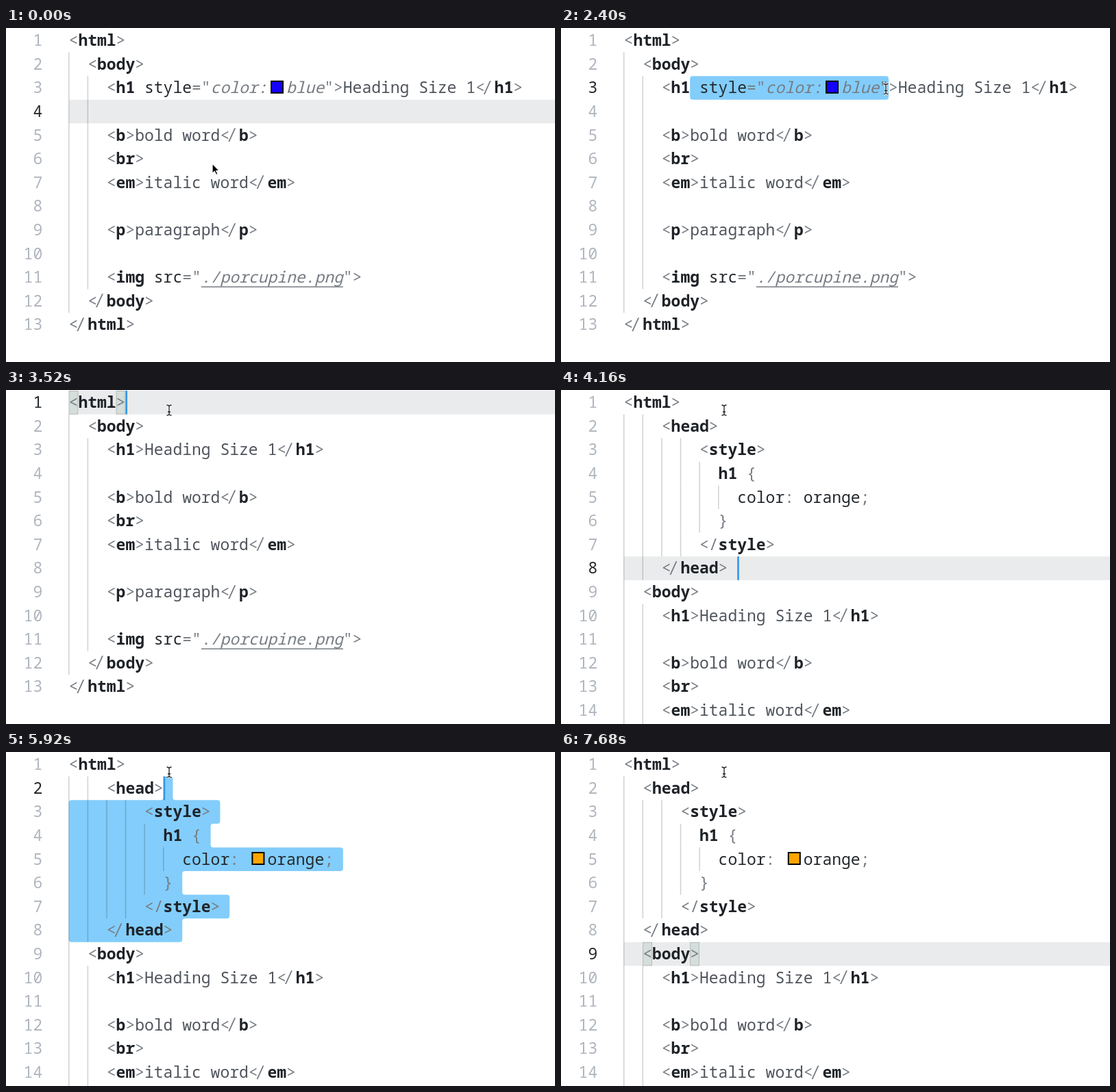
An HTML page for the animation above (8 s loop, 801 px wide and 488 px high).

```html
<!DOCTYPE html>
<html lang="en">
<head>
<meta charset="utf-8">
<title>Editing HTML</title>
<style>
  html, body { margin: 0; width: 100%; height: 100%; overflow: hidden; background: #fff; }
  svg { display: block; width: 801px; height: 488px; }
  text { font: 23px "Noto Sans Mono", "DejaVu Sans Mono", monospace; fill: #4f545c; }
  .p { fill: #777c83; }
  .t { fill: #1f2328; font-weight: 700; }
  .a { fill: #24292e; }
  .s, .u { fill: #777c83; font-style: italic; }
  .n { fill: #b0b6be; text-anchor: end; }
  .n.on { fill: #24292e; }
</style>
</head>
<body>
<svg id="stage" viewBox="0 0 801 488"></svg>
<script>
const LOOP = 8000, STEP = 160;
const X0 = 91.6, CELL = 13.8, TOP = 1, ROW = 34.6, BASE = 25.2;
const stage = document.getElementById('stage');
const rowY = line => TOP + (line - 1) * ROW;

// A line is { indent, parts }, a part is [class, text]; "sw" parts are colour swatches.
const line = (indent, ...parts) => ({ indent, parts });
const open = name => [['p', '<'], ['t', name], ['p', '>']];
const close = name => [['lig', '</'], ['t', name], ['p', '>']];
const blank = () => line(4);

function heading(styled) {
  const attr = [['a', ' style'], ['p', '="'], ['s', 'color:'], ['sw', '#1400ff'], ['s', 'blue'], ['p', '"']];
  return line(4, ['p', '<'], ['t', 'h1'], ...(styled ? attr : []), ['p', '>'],
    ['x', 'Heading Size 1'], ...close('h1'));
}

function head(indent, swatch) {
  return [
    line(indent, ...open('head')),
    line(indent + 4, ...open('style')),
    line(indent + 6, ['t', 'h1'], ['p', ' {']),
    line(indent + 8, ['a', 'color'], ['p', ': '], ...(swatch ? [['sw', '#ffa500']] : []),
      ['a', 'orange'], ['p', ';']),
    line(indent + 6, ['p', '}']),
    line(indent + 4, ['p', '</'], ['t', 'style'], ['p', '>']),
    line(indent, ...close('head'), ['x', ' '])
  ];
}

const page = (inserted, styled) => [
  line(0, ...open('html')),
  ...inserted,
  line(2, ...open('body')),
  heading(styled),
  blank(),
  line(4, ...open('b'), ['x', 'bold word'], ...close('b')),
  line(4, ...open('br')),
  line(4, ...open('em'), ['x', 'italic word'], ...close('em')),
  blank(),
  line(4, ...open('p'), ['x', 'paragraph'], ...close('p')),
  blank(),
  line(4, ['p', '<'], ['t', 'img'], ['a', ' src'], ['p', '="'], ['u', './porcupine.png'], ['p', '">']),
  line(2, ...close('body')),
  line(0, ...close('html'))
];

// Each entry changes some of the state: at = [line, column], from = selection anchor.
const script = [
  [0, { doc: page([], true), at: [4, 4], from: null, caret: false, match: null, arrow: true, ring: false }],
  [320, { arrow: false }],
  [960, { at: [3, 7], caret: true, ring: true }],
  [1120, { from: [3, 7], at: [3, 8] }],
  [1280, { at: [3, 11] }],
  [1440, { at: [3, 17] }],
  [1600, { at: [3, 24] }],
  [1760, { at: [3, 26] }],
  [2080, { ring: false }],
  [2240, { caret: false }],
  [2560, { doc: page([], false), from: null, at: [3, 7], caret: true, match: [4, 7] }],
  [3200, { at: [1, 6], match: [0, 5], ring: true }],
  [3520, { ring: false }],
  [3680, { caret: false }],
  [3840, { doc: page([line(2)], false), at: [2, 2], caret: true, match: null }],
  [4160, { doc: page(head(4, false), false), at: [8, 12] }],
  [4640, { doc: page(head(4, true), false), caret: false }],
  [5120, { from: [8, 12], at: [7, 12], caret: true }],
  [5280, { at: [6, 11] }],
  [5440, { at: [5, 12] }],
  [5600, { at: [4, 12] }],
  [5760, { at: [3, 12] }],
  [5920, { at: [2, 10] }],
  [6400, { caret: false }],
  [6560, { doc: page(head(2, true), false), from: [8, 10], at: [2, 8], caret: true }],
  [7040, { from: null, at: [8, 10] }],
  [7200, { at: [9, 8], match: [2, 7] }],
  [7680, { caret: false }]
];

const mouse = [
  [0, 301, 198], [320, 256, 148], [640, 196, 92], [960, 190, 86], [1120, 243, 90],
  [1440, 385, 94], [1760, 484, 94], [2080, 482, 92], [2400, 474, 89], [2560, 472, 89],
  [2720, 410, 72], [2880, 290, 42], [3040, 238, 29.5], [LOOP, 238, 29.5]
];

function mouseAt(t) {
  const i = mouse.findIndex(k => k[0] > t);
  const [a, b] = [mouse[i - 1], mouse[i]];
  const k = (t - a[0]) / (b[0] - a[0]);
  return [1, 2].map(j => a[j] + (b[j] - a[j]) * k);
}

const rect = (x, y, w, h, fill, more = '') =>
  `<rect x="${x}" y="${y}" width="${w}" height="${h}" fill="${fill}" ${more}/>`;
const glyphs = (x, y, cls, str) =>
  `<text x="${x}" y="${y}" class="${cls}" xml:space="preserve">${str.replace(/</g, '&lt;')}</text>`;

// Joined "</": the slash is taller, leans more and touches the bracket.
const ligature = (x, y) => glyphs(x, y, 'p', '<') +
  `<g transform="matrix(1 0 -.16 1.2 ${x + 9} ${y + 1.6})">${glyphs(0, 0, 'p', '/')}</g>`;

// Pixel x of a column; a swatch takes two cells but no column.
function colX(row, col) {
  let c = row.indent, extra = 0;
  for (const [cls, str] of row.parts) {
    if (cls !== 'sw') c += str.length;
    else if (c < col) extra += 2;
  }
  return X0 + (col + extra) * CELL;
}

const rowEnd = row =>
  X0 + CELL * row.parts.reduce((n, [cls, str]) => n + (cls === 'sw' ? 2 : str.length), row.indent);

function drawRow(row, y) {
  let x = X0 + row.indent * CELL, out = '';
  const base = y + BASE;
  for (const [cls, str] of row.parts) {
    const w = (cls === 'sw' ? 2 : str.length) * CELL;
    if (cls === 'sw') {
      out += rect(x + 5.6, y + 7.6, 17, 17, str, 'stroke="#000" stroke-width="2"');
    } else if (cls === 'lig') {
      out += ligature(x, base);
    } else {
      const lead = str.length - str.trimStart().length;
      out += glyphs(x + lead * CELL, base, cls, str.trim());
      if (cls === 'u') out += rect(x, y + 30.5, w, 1.5, '#777c83');
    }
    x += w;
  }
  return out;
}

function roundedPath(points, r) {
  const n = points.length;
  const toward = (p, q) => {
    const d = Math.hypot(q[0] - p[0], q[1] - p[1]) || 1;
    const k = Math.min(r, d / 2) / d;
    return [p[0] + (q[0] - p[0]) * k, p[1] + (q[1] - p[1]) * k];
  };
  return points.map((p, i) =>
    `${i ? 'L' : 'M'}${toward(p, points[(i + n - 1) % n])} Q${p} ${toward(p, points[(i + 1) % n])}`
  ).join('') + 'Z';
}

function drawSelection(doc, a, b) {
  const [first, last] = a[0] < b[0] || (a[0] === b[0] && a[1] < b[1]) ? [a, b] : [b, a];
  const start = colX(doc[first[0] - 1], first[1]);
  const points = [[start, rowY(first[0])]];
  for (let i = first[0]; i <= last[0]; i++) {
    const row = doc[i - 1];
    const right = i === last[0] ? colX(row, last[1]) : rowEnd(row) + CELL;
    points.push([right, rowY(i)], [right, rowY(i + 1)]);
  }
  if (first[0] === last[0]) {
    points.push([start, rowY(first[0] + 1)]);
  } else {
    const y = rowY(first[0] + 1);
    points.push([X0, rowY(last[0] + 1)], [X0, y], [start, y]);
  }
  return `<path d="${roundedPath(points, 4)}" fill="#82cdfb"/>`;
}

function drawMouse(x, y, s) {
  if (s.arrow) {
    return `<path transform="translate(${x} ${y})" d="M0 0V14.5L3.3 11.4L5.6 16.6L8 15.6L5.8 10.5H10.2Z"
      fill="#000" stroke="#fff" stroke-width="1.2"/>`;
  }
  const beam = 'M-3.5 -7.5Q0 -7.5 0 -5V5Q0 7.5 -3.5 7.5M3.5 -7.5Q0 -7.5 0 -5M0 5Q0 7.5 3.5 7.5M-2 2.5H2';
  const stroke = (color, w) => `<path d="${beam}" fill="none" stroke="${color}" stroke-width="${w}"/>`;
  const ring = s.ring ? '<circle r="16.7" fill="none" stroke="#111" stroke-width="1.1"/>' : '';
  return `<g transform="translate(${x} ${y})">${ring}${stroke('#fff', 3)}${stroke('#222', 1.3)}</g>`;
}

function draw(t) {
  const s = Object.assign({}, ...script.filter(k => k[0] <= t).map(k => k[1]));
  const [active, col] = s.at;
  const y = rowY(active), row = s.doc[active - 1];
  let out = s.from ? drawSelection(s.doc, s.from, s.at) : rect(X0, y, 801 - X0, ROW, '#eaebed');
  if (!s.from && s.match) {
    for (const c of s.match) {
      out += rect(colX(row, c) + .5, y + .5, CELL - 1, ROW - 1, '#d4dedb', 'stroke="#b6bab9"');
    }
  }
  s.doc.forEach((r, i) => {
    const top = rowY(i + 1);
    for (let c = 0; c < r.indent; c += 2) {
      out += rect(X0 + c * CELL - .6, top, 1.5, ROW, '#000', 'fill-opacity=".18"');
    }
    out += glyphs(53.2, top + BASE, i + 1 === active ? 'n on' : 'n', String(i + 1)) + drawRow(r, top);
  });
  if (s.caret) out += rect(colX(row, col), y, 2.6, ROW, '#3496e6');
  stage.innerHTML = out + drawMouse(...mouseAt(t), s);
}

let shown = -1;
function tick() {
  const t = Math.floor(performance.now() % LOOP / STEP) * STEP;
  if (t !== shown) draw(shown = t);
  requestAnimationFrame(tick);
}
tick();
</script>
</body>
</html>
```
